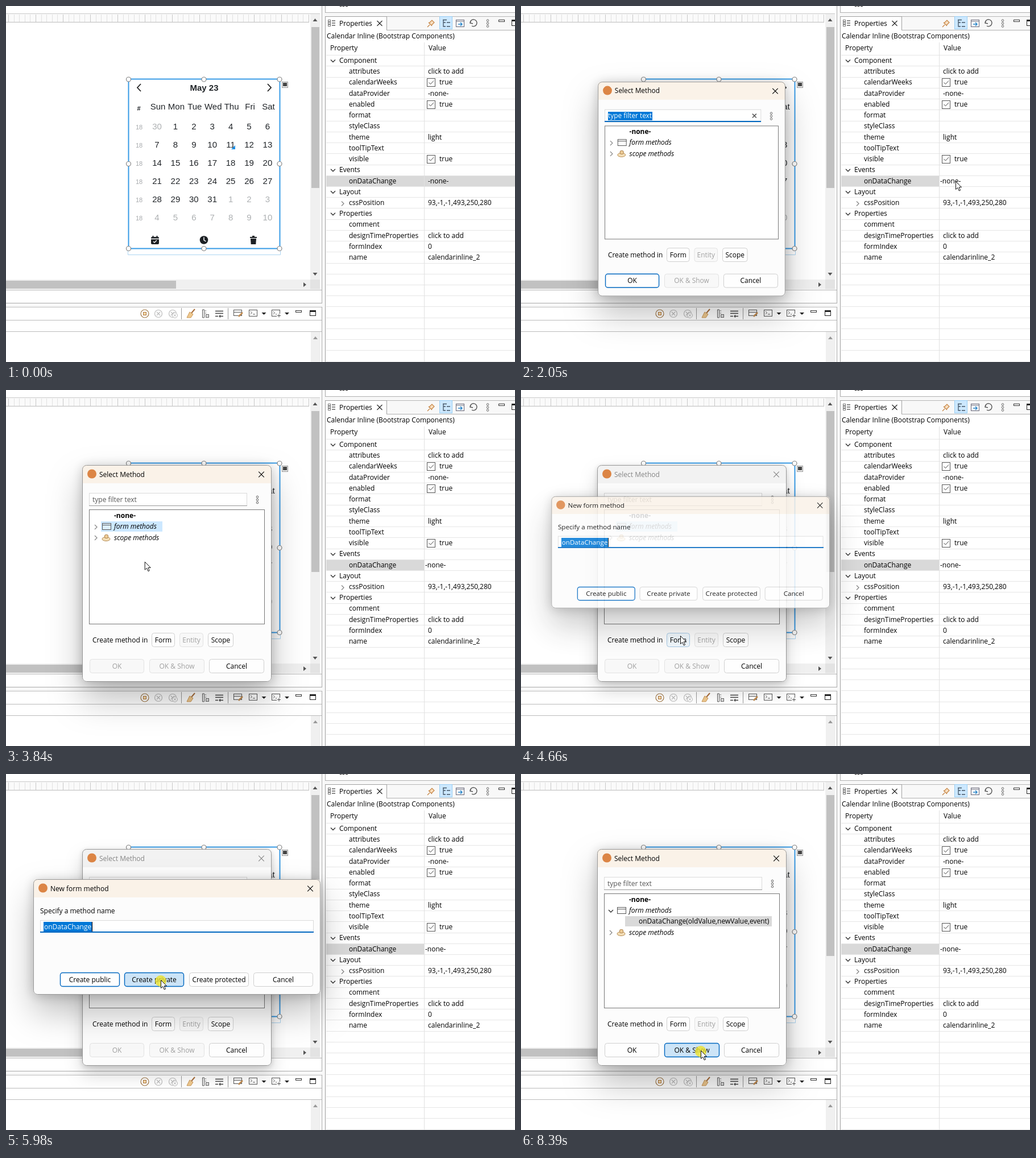
These frames come from a looping animation (895x626 px, 8460 ms). An HTML page:

```html
<!DOCTYPE html>
<html lang="en">
<head>
<meta charset="utf-8">
<title>Select a method for an event</title>
<style>
html, body { margin: 0; width: 100%; height: 100%; overflow: hidden; background: #fff; }
svg { display: block; width: 895px; height: 626px; font: 12px "Open Sans", "Noto Sans", sans-serif; fill: #000; }
text { white-space: pre; }
.cal { font: 15px "Liberation Sans", Arial, sans-serif; text-anchor: middle; fill: #212529; }
.week { font-size: 11px; fill: #a5a8ab; }
.mute { fill: #adb0b2; }
.mid { text-anchor: middle; }
.bold { font-weight: 700; }
.it { font-style: italic; }
.crisp { shape-rendering: crispEdges; }
.raised { filter: drop-shadow(0 2px 10px rgba(0, 0, 0, .2)) drop-shadow(0 30px 29px rgba(0, 0, 0, .25)); }
.resting { filter: drop-shadow(0 2px 5px rgba(0, 0, 0, .15)) drop-shadow(0 15px 15px rgba(0, 0, 0, .17)); }
</style>
</head>
<body>
<svg viewBox="0 0 895 626">
  <g id="ide"></g><g id="panel"></g><g id="select"></g><g id="create"></g><g id="pointer"></g>
</svg>
<script>
const LOOP = 8460, TICK = 66;
const BLUE = '#0067c0', PICK = '#cce8ff', GREY = '#d9d9d9', THUMB = '#c1c1c1';

const text = (x, y, s, cls = '', extra = '') => `<text x="${x}" y="${y + 4}" class="${cls}" ${extra}>${s}</text>`;
const box = (x, y, w, h, fill, extra = 'class="crisp"') =>
  `<rect x="${x}" y="${y}" width="${w}" height="${h}" fill="${fill}" ${extra}/>`;
const frame = (x, y, w, h, stroke, fill = 'none', extra = '') =>
  box(x + .5, y + .5, w - 1, h - 1, fill, `stroke="${stroke}" ${extra}`);
const path = (d, stroke = '#444', fill = 'none', width = 1) =>
  `<path d="${d}" stroke="${stroke}" fill="${fill}" stroke-width="${width}"/>`;
const disc = (x, y, r, fill, stroke = 'none', width = 1) =>
  `<circle cx="${x}" cy="${y}" r="${r}" fill="${fill}" stroke="${stroke}" stroke-width="${width}"/>`;
const each = (list, fn) => list.map(fn).join('');
const range = n => [...Array(n).keys()];

const down = (x, y) => path(`M${x - 4} ${y - 2}l4 4 4-4`, '#333', 'none', 1.4);
const right = (x, y) => path(`M${x - 2} ${y - 4}l4 4-4 4`, '#888', 'none', 1.3);
const cross = (x, y, r, width = 1.1, color = '#222') =>
  path(`M${x - r} ${y - r}l${2 * r} ${2 * r}m0 ${-2 * r}l${-2 * r} ${2 * r}`, color, 'none', width);
const wedge = (x, y, h, color = '#555') => path(`M${x - 4} ${y}h8l-4 ${h}z`, 'none', color);
const dots = (x, y) => each([-5, 0, 5], d => disc(x, y + d, 1.8, '#fff', '#666'));

function calendar() {
  const colX = i => 265.5 + i * 32.4, rowY = i => 212 + i * 32;
  let s = path('M214.5 429V437.5H482.5V429', '#acd5f2') + frame(215, 128, 267, 299, '#389be6', '#fff', 'stroke-width="2"');
  s += path('M237 137l-6 6.5 6 6.5M460 137l6 6.5-6 6.5', '#222', 'none', 1.8);
  s += '<g class="cal">' + text(348.5, 144.5, 'May 23', 'bold') + text(233.5, 180, '#', 'bold', 'font-size="11"');
  s += each(['Sun', 'Mon', 'Tue', 'Wed', 'Thu', 'Fri', 'Sat'], (d, i) => text(colX(i) + 1.5, 177.5, d));
  s += each(range(6), r => text(234, rowY(r) + 1, '18', 'week'));
  s += each(range(42), i => {
    const n = i < 1 ? 30 : i > 31 ? i - 31 : i;
    return text(colX(i % 7), rowY(Math.floor(i / 7)) + 1.2, n, i < 1 || i > 31 ? 'mute' : '');
  });
  s += '</g>' + path('M403 245v7h-7z', 'none', '#1d8fe6');
  s += box(255, 406, 14, 13, '#1d2125', 'rx="2"') + path('M258.5 404v3m7-3v3', '#1d2125', 'none', 2)
    + path('M255 409.5h14M259 414l2 2 4-4', '#fff', 'none', 1.3);
  s += disc(348, 411.5, 7.3, '#1d2125') + path('M348 406.5v5l3.5 2.5', '#fff', 'none', 1.5);
  s += path('M429 407h12M433 405h4', '#1d2125', 'none', 2) + path('M430 409h10l-.7 10h-8.6z', 'none', '#1d2125');
  s += each([[215.5, 129], [348, 129], [481, 129], [215.5, 277.5], [481, 277.5], [215.5, 426.5], [348, 426.5], [481, 426.5]],
    ([x, y]) => disc(x, y, 4, '#fff', '#858585', 1.2));
  return s + frame(485, 133, 11, 11, '#999', '#eee') + box(487, 135, 7, 6, '#444');
}

function consoleBar() {
  let s = disc(244, 541, 7, '#fff', '#a07848', 1.2) + frame(241, 538, 6, 6, '#b07840', '#f5d9a8');
  s += each([268, 293], x => disc(x, 541, 6.5, '#fff', '#bbb', 1.2) + cross(x, 541, 3, 1.2, '#bbb'));
  s += disc(297, 544, 4.5, '#fff', '#bbb') + cross(297, 544, 2, 1, '#bbb');
  s += box(308, 531, 1, 20, '#999') + box(390, 531, 1, 20, '#999');
  s += path('M332 533l-6 7', '#a96f3c', 'none', 2) + path('M323 538l6 4-4 6h-7z', '#c99758', '#efc98f');
  s += path('M345.5 534v14h3v-14zM350 536h2m-2 4h2', '#555') + frame(351, 542, 6, 6, '#666', '#ddd');
  s += path('M368 536.5h14M368 540.5h14M368 545.5h5m3 0h6m-5-2l-2 2 2 2', '#444', 'none', 1.3);
  s += frame(400, 534, 15, 11, '#555', '#fff') + path('M400 538.5h15', '#555') + path('M416 539l-7 7', '#c08a4f', 'none', 2.5);
  s += each([427, 467], x => frame(x, 534, 15, 12, '#555', '#fff') + path(`M${x + 3} 537l2.5 2.5-2.5 2.5m4 0h4`, '#555'));
  s += box(476, 541, 8, 7, '#fff') + path('M477 544.5h6m-3-3v6', '#555');
  s += wedge(453.5, 539, 4, '#222') + wedge(494, 539, 4, '#222');
  return s + frame(509, 535, 11, 4, '#333', '#fff') + frame(534, 535, 11, 10, '#222', '#fff') + box(534, 535, 11, 3, '#222');
}

function ide() {
  let s = box(0, 0, 895, 626, '#f8f8f8') + box(0, 0, 555, 523, '#fff') + box(0, 529, 555, 97, '#fff');
  s += box(0, 13, 552, 1, '#c9c9c9') + box(0, 14, 533, 14, '#fafafa') + box(0, 28, 533, 1, '#bdbdbd');
  s += each(range(56), i => box(Math.round(4 + i * 9.6), 15, 1, 13, i % 5 ? '#e1e1e1' : '#c8c8c8'));
  s += box(535, 14, 17, 467, '#f0f0f0') + box(537, 37, 14, 283, THUMB) + wedge(543.5, 27, -5) + wedge(543.5, 469, 5);
  s += box(0, 481, 535, 17, '#f0f0f0') + box(0, 483, 299, 14, THUMB) + box(535, 481, 17, 17, '#e3e3e3')
    + path('M523 486l5 4-5 4z', 'none', '#555');
  s += box(0, 499, 555, 1, '#b5b5b5') + box(0, 522, 556, 1, '#aaa') + box(555, 0, 1, 523, '#aaa');
  s += box(0, 529, 556, 1, '#bbb') + box(555, 529, 1, 97, '#aaa') + box(0, 552, 555, 1, '#bbb') + box(0, 572, 555, 1, '#bbb');
  s += box(536, 573, 17, 53, '#f0f0f0') + wedge(544, 586, -5, '#999');
  return s + calendar() + consoleBar();
}

const rows = [
  ['Component'], ['attributes', 'click to add'], ['calendarWeeks', true], ['dataProvider', '-none-'], ['enabled', true],
  ['format', ''], ['styleClass', ''], ['theme', 'light'], ['toolTipText', ''], ['visible', true], ['Events'],
  ['onDataChange', '-none-'], ['Layout'], ['cssPosition', '93,-1,-1,493,250,280'], ['Properties'], ['comment', ''],
  ['designTimeProperties', 'click to add'], ['formIndex', '0'], ['name', 'calendarinline_2']
];

function panel(active, picked, editing) {
  const rowY = i => 96 + i * 19.23;
  let s = box(561, 0, 334, 12, '#fff') + box(561, 11, 334, 1, '#b0b0b0') + box(561, 0, 1, 12, '#aaa') + text(585, -3, 'css');
  s += box(561, 18, 334, 608, '#fff') + box(561, 18, 1, 608, '#a0a0a0') + box(670, 18, 225, 24, '#f8f8f8');
  s += box(561, 18, 109, 1, '#a0a0a0') + box(669, 18, 1, 24, '#a0a0a0') + box(669, 42, 226, 1, '#b0b0b0') + box(670, 18, 225, 1, '#b8b8b8');
  if (active) s += box(561, 18, 109, 2, '#1c7fd0');
  s += each([0, 1, 2], i => frame(566, 24 + i * 4, 5, 4, '#777') + box(573, 25 + i * 4, 6, 2, '#888'));
  s += text(586, 30.5, 'Properties') + cross(657, 30.5, 4.5);
  s += path('M741 37l4-4m-2-4l6 6m-5-5l5-5 4 4-5 5', '#c68545', '#f8dfc0', 1.2);
  s += frame(762, 18, 23, 23, '#99cdf2', PICK) + path('M769 24v12h4m-4-7h4m2 0h6m-6 7h6M768 24.5h7', '#456', 'none', 1.3);
  s += frame(791, 24, 15, 13, '#667', '#fff') + path('M791 27h15', '#667') + path('M795 32h7m-3-3l3 3-3 3', '#2d87c9', 'none', 1.5);
  s += path('M818 25l-2 5 5 1M816 30a6 6 0 1 1 3 5', '#555', 'none', 1.4) + dots(847, 30.5);
  s += frame(866, 24, 11, 4, '#333', '#fff') + frame(889, 24, 12, 11, '#222', '#fff') + box(889, 24, 8, 3, '#222');
  s += text(564, 53, 'Calendar Inline (Bootstrap Components)') + text(570, 74, 'Property') + text(743, 74, 'Value');
  const top = Math.round(rowY(11) - 9.5);
  s += box(563, top, 332, 19, picked ? PICK : GREY);
  if (editing) s += box(736, top, 159, 19, '#fff');
  s += each(range(29), i => box(563, Math.round(86.2 + i * 19.23), 332, 1, '#e6e6e6')) + box(735, 64, 1, 562, '#e1e1e1');
  return s + each(rows, ([name, value], i) => {
    const y = rowY(i);
    if (value === undefined) return down(575, y + .5) + text(586, y, name);
    let r = text(603, y, name);
    if (value === true) {
      r += frame(740, Math.round(y) - 7, 15, 15, '#555', '#fff') + path(`M743.5 ${y}l3 3 5.5-6`, '#444') + text(762, y, 'true');
    } else r += text(editing && i === 11 ? 737 : 742, y, value);
    return r + (name === 'cssPosition' ? right(592, y + 1.5) : '');
  });
}

const looks = {
  plain: ['#fefefe', '#cfcfcf'], off: ['#f8f8f8', '#e2e2e2'], focus: ['#fefefe', BLUE],
  hover: ['#f0f7fc', '#a5c8e4'], press: ['#cce4f7', BLUE]
};
function button(x, y, w, label, look = 'plain') {
  const [fill, edge] = looks[look];
  return frame(x, y, w, 25, edge, fill, `rx="4" stroke-width="${edge === BLUE ? 1.4 : 1}"`)
    + text(x + w / 2, y + 12.5, label, 'mid', look === 'off' ? 'fill="#a0a0a0"' : '');
}

function dialog(x, y, w, h, title, active, { scale, opacity }, content) {
  const cx = x + w * .35, cy = y + h * .31, ink = active ? '#000' : '#858585';
  return `<g opacity="${opacity}" transform="translate(${cx} ${cy}) scale(${scale}) translate(${-cx} ${-cy})">`
    + box(x, y, w, h, '#fcfcfc', `rx="7" class="${active ? 'raised' : 'resting'}"`)
    + path(`M${x} ${y + 32}v-25q0-7 7-7h${w - 14}q7 0 7 7v25z`, 'none', active ? '#faf2e8' : '#f2f2f2')
    + frame(x, y, w, h, '#989898', 'none', 'rx="7"')
    + disc(x + 17, y + 15.5, 8, '#dc8545') + text(x + 30, y + 16.5, title, '', `fill="${ink}"`)
    + cross(x + w - 18, y + 16.5, 4.8, 1.1, ink) + content + '</g>';
}

function field(x, y, w, h, focused) {
  return frame(x, y, w, h, '#dadada', '#fff') + box(x, y + h - (focused ? 2 : 1), w, focused ? 2 : 1, focused ? BLUE : '#999');
}

function selectDialog(o) {
  const scopeY = o.created ? 279 : 260;
  let s = field(146, 181, 278, 23, o.filter);
  if (o.filter) s += box(152, 185, 79, 16, '#0078d7') + cross(412, 192.5, 3.5, 1.5, '#555');
  s += text(152, 192.5, 'type filter text', '', `fill="${o.filter ? '#fff' : '#555'}"`) + dots(442, 193);
  s += frame(146, 210, 309, 202, '#777', '#fff') + text(190, 221, '-none-', 'bold');
  if (o.form) s += box(167, 231, 108, 18, o.form);
  if (o.scopeHover) s += box(167, 250, 112, 19, '#e5f3ff');
  s += (o.created ? down : right)(158, 241) + frame(169, 234, 16, 12, '#555', o.form === PICK ? '#dcefff' : '#fff') + path('M169 237.5h16', '#555');
  s += text(190, 240, 'form methods', 'it');
  if (o.created) s += box(183, 250, 258, 18, GREY) + text(207, 259, 'onDataChange(oldValue,newValue,event)');
  s += right(158, scopeY) + `<ellipse cx="176" cy="${scopeY + 2}" rx="7" ry="3.5" fill="#f4dfb8" stroke="#b58a50"/>`
    + frame(173, scopeY - 6, 7, 7, '#a87c48', '#edcc96', 'rx="2"') + text(190, scopeY, 'scope methods', 'it');
  s += text(152, 440, 'Create method in') + button(256, 427, 41, 'Form', o.formButton)
    + button(305, 427, 42, 'Entity', 'off') + button(355, 427, 45, 'Scope');
  s += button(147, 473, 96, 'OK', o.ok) + button(252, 473, 97, 'OK &amp; Show', o.show) + button(357, 473, 97, 'Cancel');
  return dialog(134, 132, 333, 381, 'Select Method', o.active, o.pose, s);
}

function createDialog(pose, look, caret) {
  let s = text(60, 240.5, 'Specify a method name') + field(60, 257, 481, 22, true);
  s += box(66, 260, 85, 17, '#0078d7') + text(67, 268.5, 'onDataChange', '', 'fill="#fff"');
  if (caret) s += box(151, 260, 1, 17, '#000');
  s += button(95, 349, 105, 'Create public', 'focus') + button(208, 349, 105, 'Create private', look)
    + button(322, 349, 105, 'Create protected') + button(435, 349, 105, 'Cancel');
  return dialog(48, 185, 505, 203, 'New form method', true, pose, s);
}

// start time, number of ticks, destination
const moves = [
  [190, 12, 764, 308], [2120, 9, 227, 254], [2710, 1, 226, 253], [2780, 1, 222, 243], [3840, 3, 287, 419], [4170, 1, 280, 432],
  [5110, 4, 302, 355], [5376, 4, 272, 362], [6200, 7, 318, 505], [6660, 1, 319, 513], [6730, 1, 321, 521], [6800, 7, 316, 486]
];
const clicks = [[930, 1110], [3180, 3310], [4237, 4400], [5850, 5985], [8390, LOOP]];

function pointer(t) {
  if (t < 190) return '';
  let x = 792, y = 626;
  for (const [start, n, toX, toY] of moves) {
    if (t < start) break;
    let p = Math.min(n, Math.floor((t - start) / TICK) + 1) / n;
    if (n > 4) p = (1 - Math.cos(Math.PI * p)) / 2;
    x += (toX - x) * p;
    y += (toY - y) * p;
  }
  const halo = clicks.some(([from, to]) => t >= from && t < to) ? disc(0, 2, 10, 'rgba(236,226,45,.8)') : '';
  return `<g transform="translate(${x.toFixed(1)} ${y.toFixed(1)})">${halo}`
    + path('M.5.5V14.5L3.8 11.5 6.3 17 8.5 16 6.2 10.7H10.5Z', '#111', '#fff') + '</g>';
}

function opening(t, start) {
  const i = Math.floor((t - start) / 70);
  return { scale: [.93, .97, .99][i] ?? 1, opacity: [.35, .85][i] ?? 1 };
}

const shown = {};
function put(id, markup) {
  if (shown[id] === markup) return;
  shown[id] = markup;
  document.getElementById(id).innerHTML = markup;
}

function render(t) {
  const within = (a, b) => t >= a && t < b;
  put('panel', panel(within(916, 1910), within(980, 1910), t >= 1050));
  const created = t >= 6120;
  put('select', t < 1910 ? '' : selectDialog({
    pose: opening(t, 1910), active: !within(4570, 5985), created,
    filter: t < 3245,
    form: created || t < 2780 ? '' : t < 3180 ? '#e5f3ff' : PICK,
    scopeHover: within(2648, 2780),
    formButton: within(4237, 4400) ? 'press' : within(4170, 5110) ? 'hover' : 'plain',
    ok: t >= 8390 ? 'plain' : created || t < 3245 ? 'focus' : 'off',
    show: t >= 8390 ? 'press' : t >= 6660 ? 'hover' : created ? 'plain' : 'off'
  }));
  const pose = t < 5985 ? opening(t, 4570) : { scale: t < 6050 ? .98 : .95, opacity: t < 6050 ? .6 : .2 };
  const look = t >= 5850 ? 'press' : t >= 5240 ? 'hover' : 'plain';
  put('create', within(4570, 6120) ? createDialog(pose, look, (t - 4570) % 1060 < 530) : '');
  put('pointer', pointer(t));
}

put('ide', ide());
const begin = performance.now();
(function tick() {
  render((performance.now() - begin) % LOOP);
  requestAnimationFrame(tick);
})();
</script>
</body>
</html>
```
